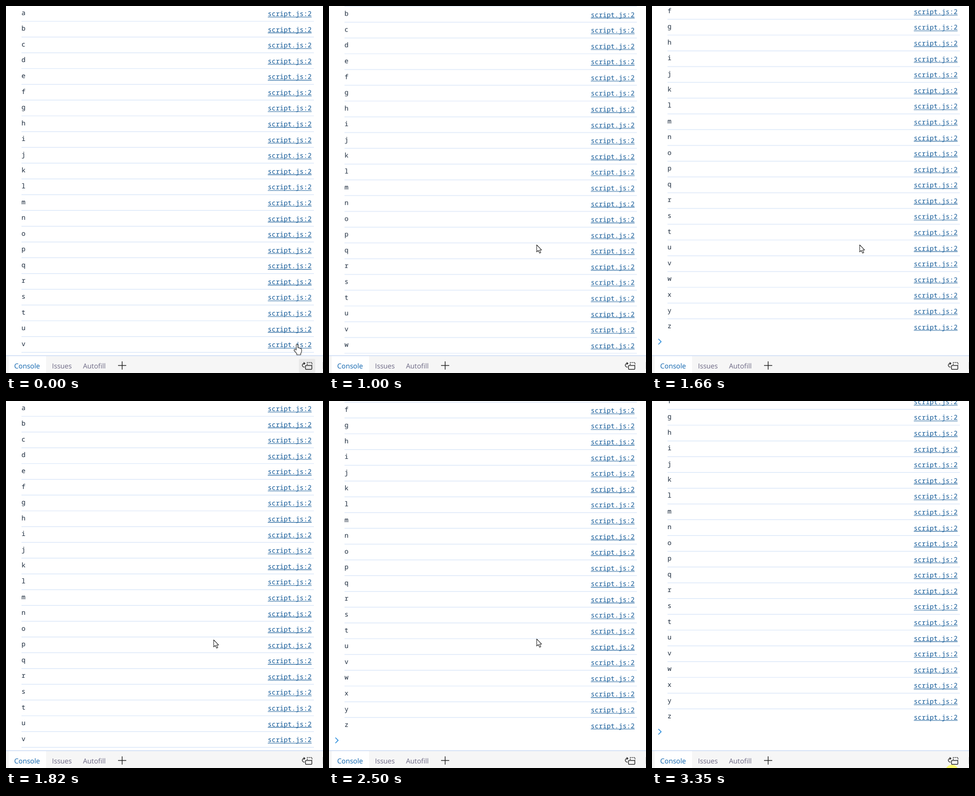
An HTML page that plays this animation: 696x805 px, repeating every 3420 ms.

```html
<!DOCTYPE html>
<html lang="en">
<head>
<meta charset="utf-8">
<title>Console scroll</title>
<style>
  html, body { margin: 0; width: 100%; height: 100%; overflow: hidden; background: #fff; }
  svg { display: block; width: 696px; height: 805px; }
  text { text-rendering: geometricPrecision; white-space: pre; }
  .row text { font: 14.57px "Noto Sans Mono", "DejaVu Sans Mono", monospace; fill: #1c2b3d; }
  .row .link { fill: #0f5796; }
  .row .underline { stroke: #0f5796; stroke-width: 1.1; }
  .row .rule { stroke: #d3e2f7; stroke-width: 1.2; }
  .tab { font: 15.1px "Open Sans", "Noto Sans", sans-serif; fill: #6c6884; font-variant-ligatures: none; }
  .tab.active { fill: #0b62ad; }
  .icon { fill: none; stroke: #1f1f1f; stroke-width: 1.5; }
</style>
</head>
<body>
<svg viewBox="0 0 696 805">
  <rect width="696" height="805" fill="#fff"/>
  <g id="log">
    <path d="M14 907.5l6 6-6 6" fill="none" stroke="#1a84d8" stroke-width="1.7"/>
  </g>

  <g id="footer">
    <rect y="766" width="696" height="39" fill="#f6f6f6"/>
    <rect y="766" width="696" height="2" fill="#d5e2f6"/>
    <rect x="6" y="768" width="82" height="37" fill="#fff"/>
    <text class="tab active" x="18" y="795">Console</text>
    <text class="tab" x="101" y="795">Issues</text>
    <text class="tab" x="169" y="795">Autofill</text>
    <path class="icon" d="M246 788.5h18M255 779.5v18"/>
    <rect id="hover" x="643" y="774" width="36" height="31" rx="3" fill="#e9e9e9"/>
    <g class="icon">
      <rect x="657.5" y="788.5" width="14" height="8.5" rx="1.5"/>
      <path d="M661.5 787v-5h10.3v6" stroke-dasharray="2.4 1.6"/>
      <path d="M656 784h-1.5a4 4 0 0 0 0 8h1M653.5 781.5l2.8 2.5-2.8 2.5"/>
    </g>
    <path d="M695.5 781v15" stroke="#d2d2d2"/>
    <circle id="halo" cx="658.5" cy="813" r="15" fill="#fdfb72"/>
  </g>

  <g id="cursor">
    <path id="arrow" d="M0 0V15.4L3.5 12.2 6.3 18.1 9 16.9 6.3 11.2H10.8Z"
      fill="#fff" stroke="#1a1a1a" stroke-width="1.1" stroke-linejoin="round"/>
    <path id="hand" d="M-2 12.2V1.8a1.9 1.9 0 0 1 3.8 0V7.6q2-1.1 3 .8 2-.8 2.7 1 2-.3 2.2 1.6V15q-.2 3-2 5v3H-.8v-2.6L-6.3 14q-1.3-2.2.4-2.9 1.1-.4 2 .4Z"
      fill="#fff" stroke="#1a1a1a" stroke-width="1.2" stroke-linejoin="round"/>
  </g>
</svg>

<script>
const LOOP = 3420;
const PITCH = 34.58;
const byId = id => document.getElementById(id);

function add(parent, tag, attrs, text = '') {
  const node = document.createElementNS('http://www.w3.org/2000/svg', tag);
  for (const name in attrs) node.setAttribute(name, attrs[name]);
  node.textContent = text;
  return parent.appendChild(node);
}

[...'abcdefghijklmnopqrstuvwxyz'].forEach((letter, i) => {
  const y = i * PITCH;
  const row = add(byId('log'), 'g', { class: 'row' });
  const line = (name, x1, x2, dy) => add(row, 'line', { class: name, x1, x2, y1: y + dy, y2: y + dy });
  add(row, 'text', { x: 34, y: y + 19.6 }, letter);
  add(row, 'text', { class: 'link', x: 574.8, y: y + 22 }, 'script.js:2');
  line('underline', 574.8, 671, 24.3);
  if (letter !== 'z') line('rule', 34, 676, 33.5);
});

// Each step is [ms, value, easing towards the next step].
function play(id, property, steps, toCss = value => value, easing = 'linear') {
  const frames = steps.map(([ms, value, ease = easing]) =>
    ({ offset: ms / LOOP, [property]: toCss(value), easing: ease }));
  byId(id).animate(frames, { duration: LOOP, iterations: Infinity });
}

const show = (id, steps) => play(id, 'opacity', steps, Number, 'step-end');

const WHEEL = 'cubic-bezier(.3, .1, .6, .9)';
play('log', 'transform', [
  [0, 0], [955, 0, WHEEL], [1160, 179, 'ease-out'], [1240, 188],
  [1635, 188, 'ease-in'], [1660, 178, 'cubic-bezier(.25, .15, .6, 1)'], [1820, 0],
  [2165, 0, WHEEL], [2500, 169, 'ease-out'], [2740, 188], [LOOP, 188]
], y => `translateY(${-y}px)`);

play('cursor', 'transform', [
  [0, [640, 743]], [15, [640, 743], 'cubic-bezier(.25, .3, .5, 1)'], [530, [456, 524]],
  [2400, [456, 524]], [2500, [456, 522], 'ease-in'],
  [2700, [600, 690]], [2790, [700, 776]], [LOOP, [700, 776]]
], ([x, y]) => `translate(${x}px, ${y}px)`);

show('hand', [[0, 1], [90, 0], [LOOP, 0]]);
show('arrow', [[0, 0], [90, 1], [2790, 0], [LOOP, 0]]);
show('hover', [[0, 1], [40, 0], [LOOP, 0]]);
show('halo', [[0, 0], [3350, 1], [LOOP, 1]]);
</script>
</body>
</html>
```
